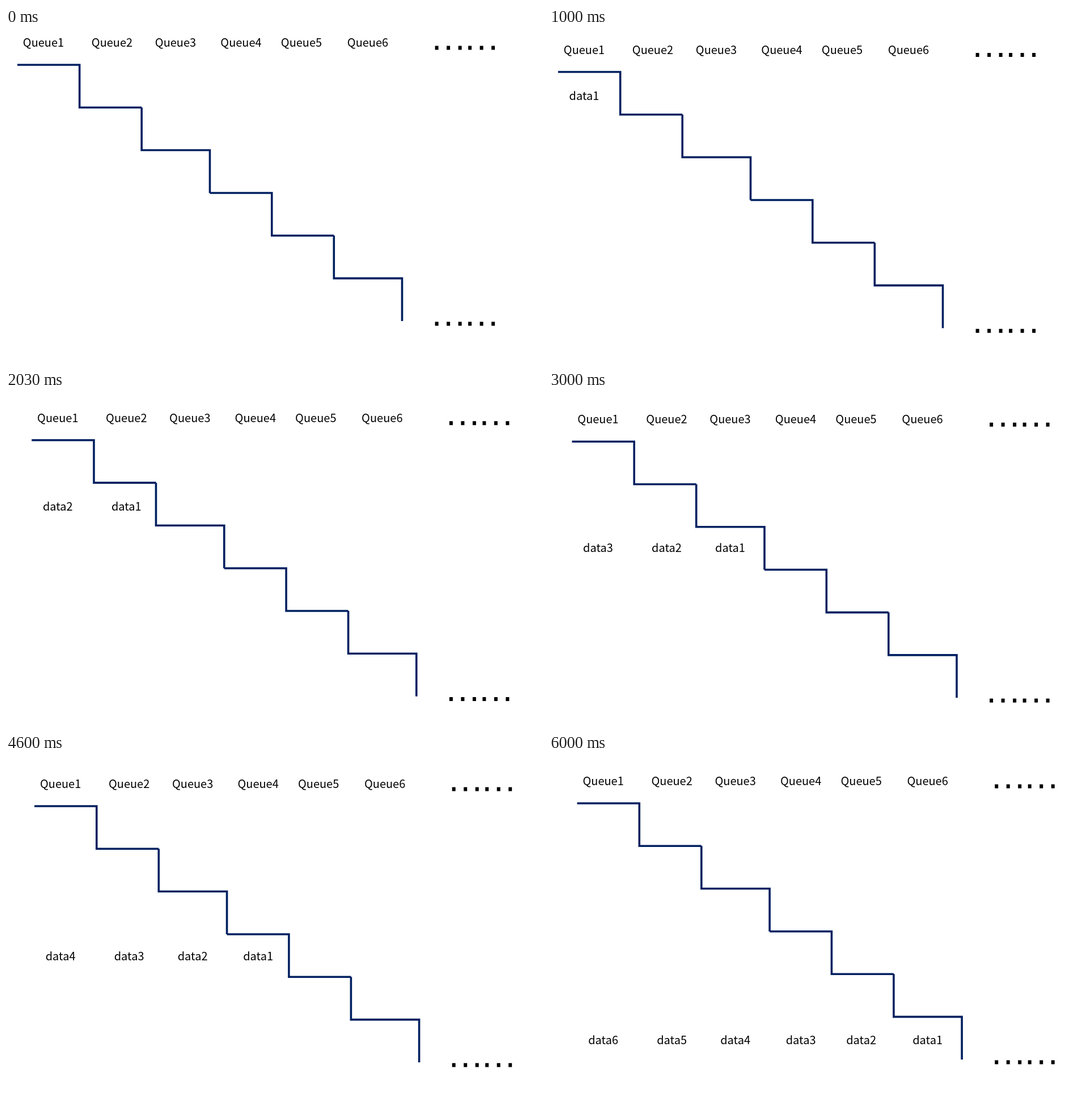
Write an HTML page that moves like this. It is 947 px wide and 591 px high and loops after 7 s.

```html
<!DOCTYPE html>
<html lang="en">
<head>
<meta charset="utf-8">
<title>Staggered queues</title>
<style>
  html, body { margin: 0; width: 100%; height: 100%; overflow: hidden; background: #fff; }
  svg { display: block; }
  text { font: 300 20px "Noto Sans CJK SC", "Noto Sans CJK JP", "Noto Sans CJK", sans-serif; text-anchor: middle; fill: #000; }
  path { fill: none; stroke: #002060; stroke-width: 3.6; }
</style>
</head>
<body>
<svg width="947" height="591" viewBox="0 0 947 591">
  <g id="scene">
    <path d="M20 65H129.7V140.2H239.2M239.2 140.2V215.5H359.5V291M359.5 291H468.8V366.3H578.3M578.3 366.3V441.6H698.5V517"/>
    <g id="dots"></g>
    <g id="titles"></g>
    <g id="items"></g>
  </g>
</svg>
<script>
const LOOP = 7000;
const columns = [66, 187, 299, 414.5, 521, 638];
const dotColumns = [759.6, 780.1, 800.6, 818.1, 838.6, 859.1];

// Each step: start time, scene offset, baseline of the data row.
const steps = [
  { at: 0,    x: 0,    y: 0,    row: 0 },
  { at: 1000, x: -4,   y: 12.5, row: 127 },
  { at: 2030, x: 25.3, y: 21.7, row: 211.5 },
  { at: 3000, x: 20.5, y: 24.3, row: 284.5 },
  { at: 4000, x: 30.1, y: 27,   row: 363.5 },
  { at: 5000, x: 32.3, y: 16,   row: 432.5 },
  { at: 6000, x: 29.6, y: 22,   row: 512 }
];

const byId = id => document.getElementById(id);
const label = (text, x, y) => `<text x="${x}" y="${y}">${text}</text>`;

byId("titles").innerHTML = columns.map((x, i) => label(`Queue${i + 1}`, x, 33)).join("");
byId("dots").innerHTML = [35, 521.8].flatMap(y =>
  dotColumns.map(x => `<rect x="${x - 3}" y="${y - 3.5}" width="6" height="7"/>`)).join("");

let shown = -1;

function draw(now) {
  const time = now % LOOP;
  const index = steps.findLastIndex(step => step.at <= time);
  if (index !== shown) {
    const { x, y, row } = steps[index];
    byId("scene").setAttribute("transform", `translate(${x} ${y})`);
    byId("items").innerHTML = columns.slice(0, index)
      .map((column, i) => label(`data${index - i}`, column, row - y)).join("");
    shown = index;
  }
  requestAnimationFrame(draw);
}

draw(0);
</script>
</body>
</html>
```
